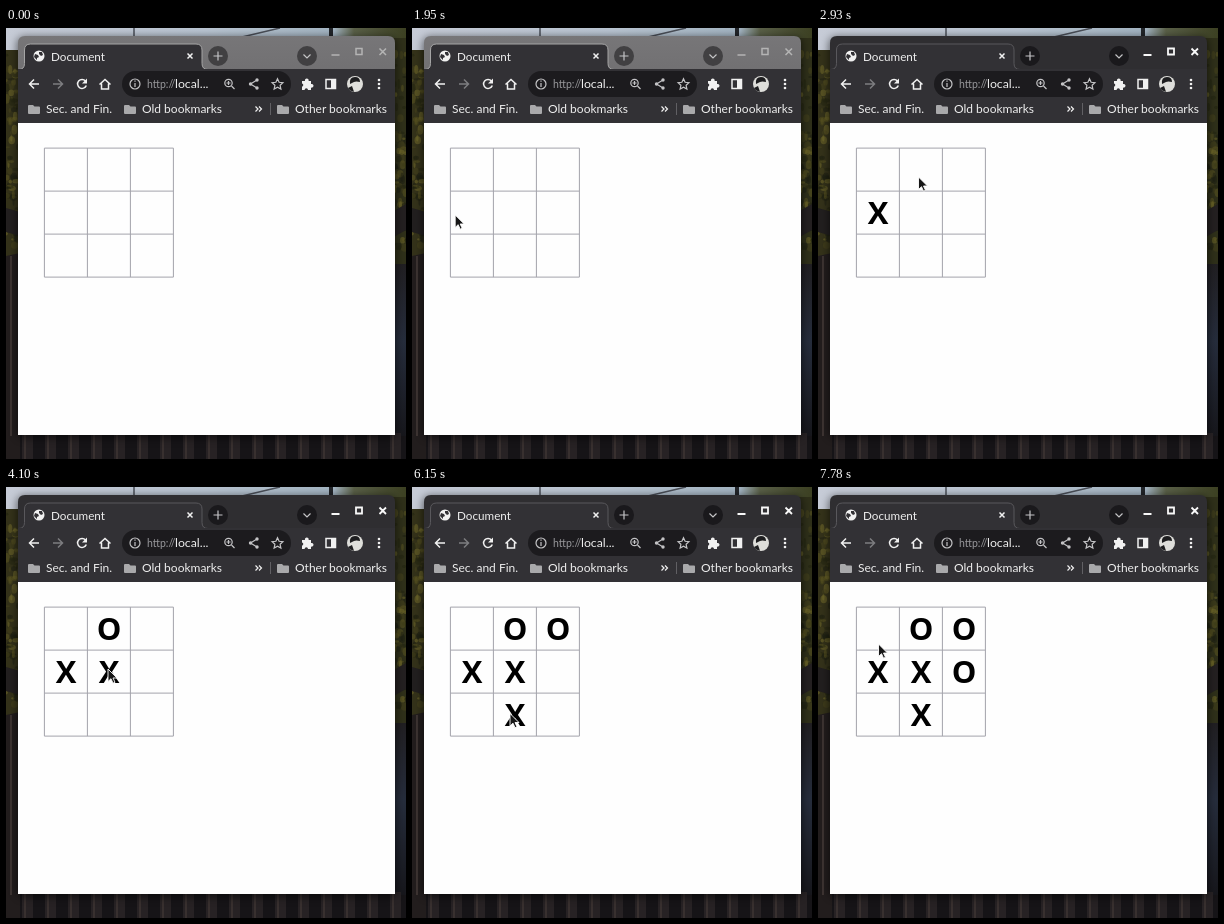
Recreate the animation shown at these times as an HTML page. Size 400x431 px, loop 8000 ms.

```html
<!DOCTYPE html>
<html lang="en">
<head>
<meta charset="utf-8">
<title>Board</title>
<style>
  html, body { margin: 0; width: 100%; height: 100%; overflow: hidden; background: #17151a; }
  svg { display: block; width: 100vw; height: 100vh; }
  text { font: 12px Lato, sans-serif; fill: #eee; }
  .line { fill: none; stroke: #f1f1f1; stroke-width: 1.5; }
  .thin { stroke-width: 1.2; stroke: #c4c4c6; }
  .board { fill: none; stroke: #a3a3ab; }
  .mark { font: bold 31px "Open Sans", "Noto Sans", sans-serif; fill: #000; text-anchor: middle; }
  #bar { fill: url(#idle); }
  #tab { fill: #323135; stroke: #a5a5a5; }
  .round { fill: #414042; }
  #controls { fill: none; stroke: #b4b4b4; stroke-width: 1.5; }
  .active #bar { fill: #2f2e31; }
  .active #tab { stroke: #59585c; }
  .active .round { fill: #1a191c; }
  .active #controls { stroke: #f8f8f8; stroke-width: 1.8; }
</style>
</head>
<body>
<svg id="stage" viewBox="0 0 400 431" preserveAspectRatio="none">
  <defs>
    <linearGradient id="idle" x2="0" y2="1">
      <stop stop-color="#777678"/><stop offset="1" stop-color="#69686a"/>
    </linearGradient>
    <linearGradient id="sky">
      <stop stop-color="#c6cbd6"/><stop offset=".5" stop-color="#b9c5d2"/>
      <stop offset=".82" stop-color="#a3b4c2"/><stop offset=".87" stop-color="#5a6048"/>
      <stop offset="1" stop-color="#3c4022"/>
    </linearGradient>
    <linearGradient id="water" x2="0" y2="1">
      <stop stop-color="#211f22"/><stop offset=".45" stop-color="#262d3c"/><stop offset="1" stop-color="#17171c"/>
    </linearGradient>
    <filter id="blur" x="-10%" y="-10%" width="120%" height="120%"><feGaussianBlur stdDeviation="4"/></filter>
    <path id="folder" d="M-5 -4h4l1.5 1.5H5q1 0 1 1V4q0 1-1 1H-5q-1 0-1-1V-3q0-1 1-1z" fill="#a9a9ab"/>
  </defs>

  <!-- backdrop -->
  <rect width="400" height="431" fill="#161417"/>
  <rect width="400" height="24" fill="url(#sky)"/>
  <rect y="22" width="14" height="207" fill="#34321a"/>
  <rect x="387" y="10" width="13" height="230" fill="#2f301a"/>
  <g id="leaves"></g>
  <path d="M128 0v9M236 9l38-9" stroke="#4a4f58" stroke-width="1.5"/>
  <path d="M325 0v10" stroke="#22252a" stroke-width="4"/>
  <path d="M0 180l14 4v24l-14-4z" fill="#221f1f"/>
  <path d="M0 228l14-3v206H0z" fill="#221d1d"/>
  <path d="M5 228v180" stroke="#3d3432" stroke-width="2"/>
  <path d="M386 184l14-8v26l-14 8z" fill="#242021"/>
  <path d="M386 236h14v172h-14z" fill="url(#water)"/>
  <g id="fence"></g>
  <rect x="11" y="9" width="379" height="401" rx="7" fill="#000" opacity=".55" filter="url(#blur)"/>

  <!-- window -->
  <path id="bar" d="M12 95V15q0-7 7-7H382q7 0 7 7V95z"/>
  <path id="tab" d="M12.5 41.5q6 0 6-6V22q0-6 6-6H190q6 0 6 6v13.5q0 6 6 6z"/>
  <rect x="12" y="41" width="377" height="54" fill="#323135"/>
  <rect x="12" y="95" width="377" height="312" fill="#fefefe"/>

  <circle cx="33" cy="28" r="5.5" fill="#f1f1f1"/>
  <path d="M29 26l3 1 1 2-2 1v2l-3-3zM33 24h3l1 3-2 1-2-2z" fill="#323135"/>
  <text x="45" y="32.5" style="font-size:11.7px">Document</text>
  <path class="line" d="M181.5 25.5l5 5m0-5l-5 5"/>
  <circle class="round" cx="212" cy="28" r="10"/>
  <path class="line thin" d="M207.5 28h9M212 23.5v9"/>
  <circle class="round" cx="301" cy="28" r="10"/>
  <path class="line thin" d="M297.5 26.5l3.5 3.5 3.5-3.5"/>
  <path id="controls" d="M325.5 27h8M350 20.500h6v6h-6zM373.5 20.500l6.500 6.500m0-6.500l-6.500 6.500"/>

  <!-- toolbar -->
  <path class="line" d="M33 56H23.5m4.500-4.500l-4.500 4.500 4.500 4.500"/>
  <path class="line" style="stroke:#7d7d80" d="M47 56h9.500m-4.500-4.500l4.500 4.500-4.500 4.500"/>
  <path class="line" d="M79.500 53a4.500 4.500 0 1 0 .8 4.500"/>
  <path d="M81 50.500v5h-5z" fill="#f1f1f1"/>
  <path class="line" d="M93.500 56.500l5.500-5 5.500 5M95.500 55.500v5.500h7v-5.500"/>
  <rect x="116" y="43" width="169" height="26" rx="13" fill="#1c1b1e"/>
  <circle class="line thin" cx="129" cy="56" r="5"/>
  <path class="line thin" d="M129 55v4M129 52.500v1.200"/>
  <text x="141" y="60" style="font-size:10.500px;fill:#98989b">http://</text>
  <text x="169" y="60" style="font-size:12.300px">local...</text>
  <circle class="line thin" cx="222.500" cy="55" r="3.700"/>
  <path class="line thin" d="M225.500 58l3 3M220.500 55h4M222.500 53v4"/>
  <path class="line thin" d="M251 52l-6.500 4 6.500 4"/>
  <g fill="#c4c4c6"><circle cx="251" cy="52" r="1.700"/><circle cx="244.500" cy="56" r="1.700"/><circle cx="251" cy="60" r="1.700"/></g>
  <path class="line thin" d="M271.500 50.800l1.600 3.500 3.800.4-2.800 2.600.8 3.800-3.400-1.900-3.400 1.900.8-3.800-2.800-2.600 3.800-.4z"/>
  <path d="M296 53h3a1.900 1.900 0 1 1 3.600 0H305v3a1.900 1.900 0 1 1 0 3.600V62h-3a1.700 1.700 0 0 0-3.400 0H296v-3.300a1.700 1.700 0 0 0 0-3.300z" fill="#f1f1f1"/>
  <path class="line" d="M320 51.500h9.500v9H320z"/>
  <path d="M325 51h5v10h-5z" fill="#f1f1f1"/>
  <circle cx="349" cy="56" r="8" fill="#dededa"/>
  <path d="M344 56q-1-7 5-7 5 0 5 5-4-1-6 0zM342 60l4-2 2 5.800q-4-.5-6-3.800z" fill="#1d1d1f"/>
  <g fill="#f1f1f1"><circle cx="373" cy="52" r="1.300"/><circle cx="373" cy="56" r="1.300"/><circle cx="373" cy="60" r="1.300"/></g>

  <!-- bookmarks -->
  <use href="#folder" x="28" y="81"/><text x="40" y="85">Sec. and Fin.</text>
  <use href="#folder" x="124" y="81"/><text x="136" y="85">Old bookmarks</text>
  <path class="line" d="M249.500 78.500l2.500 2.500-2.500 2.500M253 78.500l2.500 2.500-2.500 2.500" style="stroke-width:1.2"/>
  <path d="M264.500 75v12" stroke="#616064"/>
  <use href="#folder" x="277" y="81"/><text x="289" y="85">Other bookmarks</text>

  <!-- page -->
  <path class="board" d="M38.400 120.100h129v129h-129zM81.400 120.100v129M124.400 120.100v129M38.400 163.100h129M38.400 206.100h129"/>
  <g id="marks"></g>
  <path id="cursor" d="M0 0V12.500L3 9.700 5 14.200 7 13.300 5 9H9z" fill="#161616" stroke="#fff" stroke-width=".9" stroke-linejoin="round"/>
</svg>
<script>
const LOOP = 8000, ACTIVATE = 2270;
const byId = id => document.getElementById(id);

function add(parent, name, attrs, text = "") {
  const el = document.createElementNS("http://www.w3.org/2000/svg", name);
  for (const key in attrs) el.setAttribute(key, attrs[key]);
  el.textContent = text;
  return byId(parent).appendChild(el);
}

let seed = 7;
const random = () => (seed = seed * 16807 % 2147483647) / 2147483647;
const leafColors = ["#5d5822", "#22230f", "#45411c", "#77702c", "#1b1d12"];
for (let i = 0; i < 150; i++) {
  add("leaves", "ellipse", {
    cx: (i % 2 ? 388 : 0) + random() * 12, cy: 26 + random() * 195,
    rx: 1 + random() * 3, ry: 1 + random() * 4,
    fill: leafColors[Math.floor(random() * leafColors.length)], opacity: 0.5
  });
}
for (let x = 16; x < 390; x += 23) {
  add("fence", "rect", { x, y: 405, width: 11, height: 26, fill: "#272224" });
  add("fence", "rect", { x: x + 2, y: 405, width: 2, height: 26, fill: "#38302f" });
}

// time, letter, column, row
const marks = [
  [2310, "X", 0, 1], [3140, "O", 1, 0], [3960, "X", 1, 1],
  [4960, "O", 2, 0], [5700, "X", 1, 2], [6960, "O", 2, 1]
].map(([time, letter, col, row]) => ({
  time,
  el: add("marks", "text", { class: "mark", x: 60 + col * 43, y: 153 + row * 43 }, letter)
}));

// time, x, y of the pointer tip
const path = [
  [1480, -12, 192], [1930, 43, 187], [2130, 49, 186], [2450, 49, 186],
  [2930, 100.5, 149], [3400, 101, 148], [3900, 102, 182], [4200, 102, 182],
  [4720, 132.5, 145], [5080, 132.5, 145], [5480, 98, 226.5], [6450, 98, 226.5],
  [6780, 136, 192], [7080, 136, 192], [7730, 60.5, 157], [LOOP, 60.5, 157]
];

function pointerAt(t) {
  const next = path.findIndex(p => p[0] > t);
  if (next < 1) return [-20, 192];
  const [t0, x0, y0] = path[next - 1], [t1, x1, y1] = path[next];
  const u = (t - t0) / (t1 - t0), k = u * u * (3 - 2 * u);
  return [x0 + (x1 - x0) * k, y0 + (y1 - y0) * k];
}

const start = performance.now();
function draw() {
  const t = Math.max(0, performance.now() - start) % LOOP;
  byId("stage").classList.toggle("active", t >= ACTIVATE);
  for (const { time, el } of marks) el.setAttribute("visibility", t >= time ? "visible" : "hidden");
  byId("cursor").setAttribute("transform", `translate(${pointerAt(t)})`);
  requestAnimationFrame(draw);
}
draw();
</script>
</body>
</html>
```
